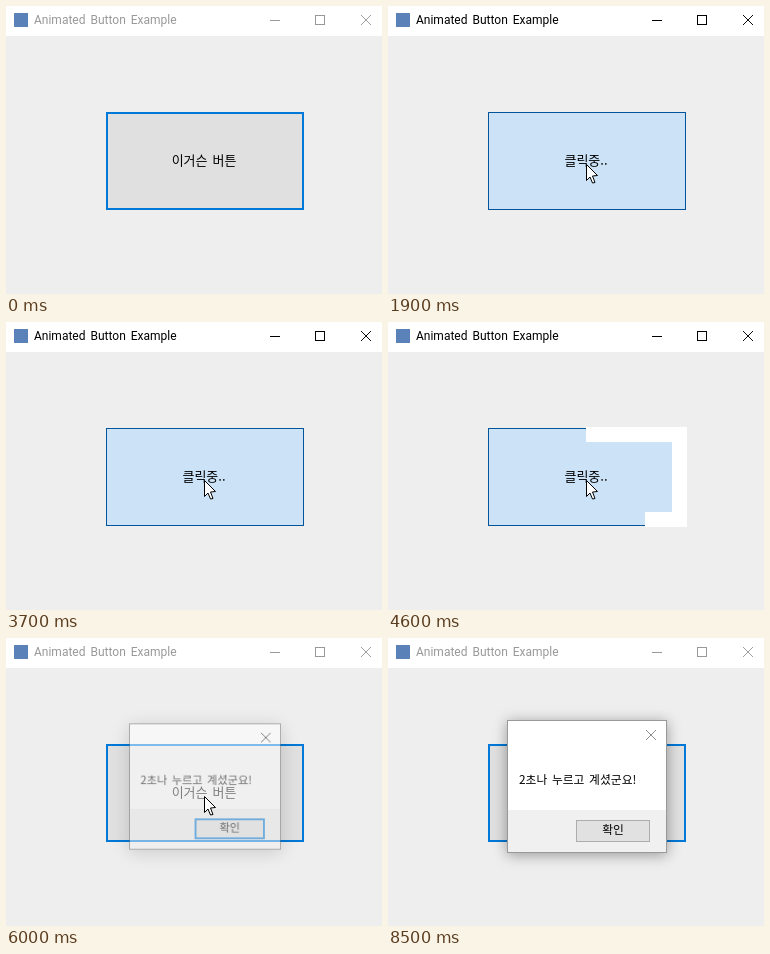
An HTML page with a canvas that plays this animation: 376 by 288 pixels, repeating every 8.6 s.

```html
<!DOCTYPE html>
<html lang="ko">
<head>
<meta charset="utf-8">
<style>
  html, body { margin: 0; width: 100%; height: 100%; overflow: hidden; background: #eee; }
  canvas { display: block; }
</style>
</head>
<body>
<canvas id="stage" width="376" height="288"></canvas>
<script>
const stage = document.getElementById('stage');
const layer = document.createElement('canvas');
layer.width = stage.width;
layer.height = stage.height;
const screen2d = stage.getContext('2d'), layer2d = layer.getContext('2d');
let ctx = screen2d;

const LOOP = 8600, STEP = 100, TICK = 109, TICKS = 20;
const HANGUL = '"Noto Sans CJK KR", "Noto Sans CJK", "Noto Sans CJK JP", sans-serif';
const BLUE = '#0078d7';
const REST = { x: 198, y: 158 };
const presses = [
  { shown: 1800, start: 1800, end: 3000 },
  { shown: 3700, start: 3650, end: 5900 }
];
const DIALOG_AT = 5900, BLUR_AT = 8400;

const clamp = v => Math.max(0, Math.min(1, v));

function rect(x, y, w, h, fill) {
  ctx.fillStyle = fill;
  ctx.fillRect(x, y, w, h);
}

function box(x, y, w, h, fill, border, line) {
  rect(x, y, w, h, border);
  rect(x + line, y + line, w - 2 * line, h - 2 * line, fill);
}

function text(str, x, y, font, color = '#000', align = 'left') {
  ctx.font = font;
  ctx.textAlign = align;
  ctx.wordSpacing = '2px';
  ctx.fillStyle = color;
  ctx.fillText(str, x, y);
}

function polyline(points, color, width) {
  ctx.beginPath();
  points.forEach(([x, y]) => ctx.lineTo(x, y));
  ctx.strokeStyle = color;
  ctx.lineWidth = width;
  ctx.stroke();
}

function cross(x, y, color) {
  polyline([[x, y], [x + 10, y + 10]], color, 0.95);
  polyline([[x + 10, y], [x, y + 10]], color, 0.95);
}

function titleBar(active) {
  const color = active ? '#000' : '#999';
  rect(0, 0, 376, 30, '#fff');
  rect(8, 7, 14, 14, '#5b82b8');
  text('Animated Button Example', 28, 18, '12px Roboto, sans-serif', color);
  rect(264, 14, 10, 1, color);
  box(309, 9, 10, 10, '#fff', color, 1);
  cross(355, 9, color);
}

// Clockwise progress along the button edge, from the top centre.
function ring(progress) {
  if (progress <= 0) return;
  const corners = [[198, 106], [297, 106], [297, 204], [99, 204], [99, 106], [198, 106]];
  const points = [corners[0]];
  let left = Math.round(progress * 592);
  for (let i = 1; i < corners.length && left > 0; i++) {
    const [ax, ay] = corners[i - 1], [bx, by] = corners[i];
    const length = Math.hypot(bx - ax, by - ay);
    const k = Math.min(1, left / length);
    points.push([ax + (bx - ax) * k, ay + (by - ay) * k]);
    left -= length;
  }
  ctx.save();
  ctx.beginPath();
  ctx.rect(99, 105, 200, 100);
  ctx.rect(114, 120, 170, 70);
  ctx.clip('evenodd');
  polyline(points, '#fff', 34);
  ctx.restore();
}

function mainButton(t, press, hover) {
  if (press) box(100, 106, 198, 98, '#cce3f7', '#005499', 1);
  else if (hover) box(100, 106, 198, 98, '#e5f1fb', BLUE, 1);
  else box(100, 106, 198, 98, '#e0e0e0', BLUE, 2);
  if (press) ring(Math.min(TICKS, Math.floor((t - press.start) / TICK)) / TICKS);
  text(press ? '클릭중..' : '이거슨 버튼', 198, 159, '13px ' + HANGUL, '#000', 'center');
}

function dialogWindow(active, deepShadow) {
  const font = '11.8px ' + HANGUL;
  ctx.save();
  ctx.shadowColor = deepShadow ? 'rgba(0,0,0,0.3)' : 'rgba(0,0,0,0.36)';
  ctx.shadowBlur = deepShadow ? 18 : 13;
  ctx.shadowOffsetY = deepShadow ? 3 : 2;
  rect(119, 82, 160, 133, active ? '#666' : '#999');
  ctx.restore();

  rect(120, 83, 158, 89, '#fff');
  rect(120, 172, 158, 42, '#f0f0f0');
  cross(258, 92, active ? '#000' : '#888');
  text('2초나 누르고 계셨군요!', 131, 146, font);
  box(188, 182, 74, 22, '#e1e1e1', active ? BLUE : '#adadad', active ? 2 : 1);
  text('확인', 225, 196, font, '#000', 'center');
}

function dialog(t) {
  const open = clamp((t - DIALOG_AT + 50) / 300);
  const scale = 0.9 + 0.1 * open;
  ctx = layer2d;
  ctx.clearRect(0, 0, layer.width, layer.height);
  dialogWindow(t < BLUR_AT, t <= BLUR_AT);
  ctx = screen2d;
  ctx.save();
  ctx.globalAlpha = open;
  ctx.translate(199, 148.5);
  ctx.scale(scale, scale);
  ctx.drawImage(layer, -199, -148.5);
  ctx.restore();
}

function pointerAt(t) {
  if (t < 700 || t >= 7500) return null;
  if (t < 1700) {
    const away = (1 - clamp((t - 600) / 1000)) ** 2;
    return { x: REST.x + 200 * away, y: REST.y + 24 * away };
  }
  const p = clamp((t - 6900) / 600);
  return { x: REST.x + 200 * p ** 1.95, y: REST.y - 6 * p };
}

function pointer({ x, y }) {
  const outline = [[0, 0], [0, 16], [3.5, 12.5], [6, 18.5], [8.5, 18], [6, 11.5], [11, 11]];
  ctx.save();
  ctx.translate(Math.round(x) + 0.5, Math.round(y) + 0.5);
  ctx.beginPath();
  outline.forEach(([px, py]) => ctx.lineTo(px, py));
  ctx.closePath();
  ctx.fillStyle = '#fff';
  ctx.fill();
  ctx.strokeStyle = '#000';
  ctx.lineWidth = 1;
  ctx.stroke();
  ctx.restore();
}

function draw(t) {
  const press = presses.find(p => t >= p.shown && t < p.end);
  const showDialog = t >= DIALOG_AT;
  const at = pointerAt(t);
  const hover = at && !showDialog && at.x < 298;
  rect(0, 0, 376, 288, '#eee');
  titleBar(t >= presses[0].shown && !showDialog);
  mainButton(t, press, hover);
  if (showDialog) dialog(t);
  if (at) pointer(at);
}

function frame() {
  const t = performance.now() % LOOP;
  draw(Math.floor(t / STEP) * STEP);
  requestAnimationFrame(frame);
}
frame();
</script>
</body>
</html>
```
